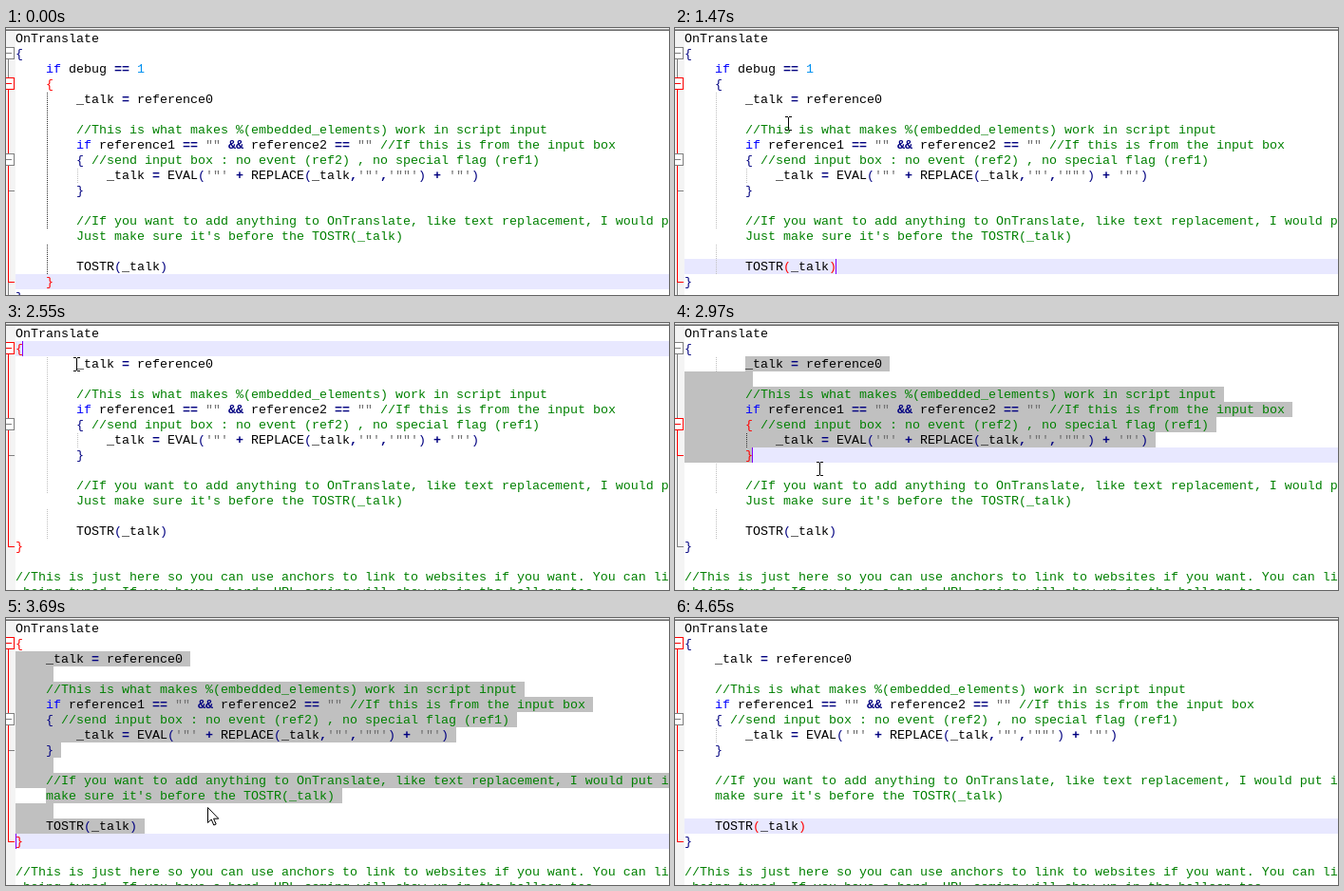
Write an HTML page that moves like this. It is 698x281 px and loops after 5130 ms.

```html
<!DOCTYPE html>
<html lang="en">
<head>
<meta charset="utf-8">
<title>Code editor</title>
<style>
  html, body { margin: 0; width: 100%; height: 100%; overflow: hidden; background: #fff; }
  #stage { position: relative; width: 698px; height: 281px; overflow: hidden; }
  #stage i, #stage p { position: absolute; margin: 0; }
  #view { font: 13.333px/16px "Liberation Mono", "Courier New", monospace; color: #000; }
  p { left: 10px; height: 16px; white-space: pre; }
  .gutter { left: 0; top: 0; width: 10px; height: 281px; background: #f4f4f4; }
  .edge { left: 0; top: 0; width: 698px; height: 1px; background: #f0f0f0;
          box-shadow: 0 1px #a0a0a0, 0 2px #696969; }
  .row { left: 10px; width: 688px; height: 16px; background: #e8e8ff; }
  .sel { height: 16px; background: #c0c0c0; }
  .guide { width: 1px; height: 16px;
           background: repeating-linear-gradient(transparent 0 1px, #c0c0c0 1px 2px); }
  .guide.on { background: repeating-linear-gradient(transparent 0 1px, #303030 1px 2px); }
  .caret { width: 1px; height: 16px; background: #8000ff; }
  .note { color: #008000; }
  .str { color: #707070; }
  .key { color: #0000ff; }
  .num { color: #0090f0; }
  .op { color: #000080; font-weight: bold; }
  .brace { color: #000080; }
  .hot { color: #f00; }
  svg { position: absolute; left: 0; top: 0; }
</style>
</head>
<body>
<div id="stage">
  <i class="gutter"></i>
  <div id="view"></div>
  <i class="edge"></i>
  <svg width="698" height="281">
    <g id="beam" shape-rendering="crispEdges">
      <path d="M-3 -6.5h3m1 0h3M-3 7.5h3m1 0h3M.5 -6v13" fill="none" stroke="#000"/>
    </g>
    <path id="arrow" d="M.5 .5v16l3.7-3.5 2.6 6 2.4-1-2.6-5.8h5.2z" fill="#fff" stroke="#000"/>
  </svg>
</div>
<script>
const LOOP = 5130, TICK = 30, LEFT = 10, TOP = 3, CELL = 8, ROW = 16;
const $ = id => document.getElementById(id);
const colX = c => LEFT + c * CELL;
const rowY = r => TOP + r * ROW;

const full = `OnTranslate
{
    if debug == 1
    {
        _talk = reference0
        
        //This is what makes %(embedded_elements) work in script input
        if reference1 == "" && reference2 == "" //If this is from the input box
        { //send input box : no event (ref2) , no special flag (ref1)
            _talk = EVAL('"' + REPLACE(_talk,'"','""') + '"')
        }
        
        //If you want to add anything to OnTranslate, like text replacement, I would put it here.
        Just make sure it's before the TOSTR(_talk)
        
        TOSTR(_talk)
    }
}

//This is just here so you can use anchors to link to websites if you want. You can link
 being typed. If you have a hard  URL coming will show up in the balloon too.`.split("\n");

const splice = (lines, at, count, ...added) => {
  const copy = lines.slice();
  copy.splice(at, count, ...added);
  return copy;
};
const unclosed = splice(full, 16, 1, "    ");
const bare = splice(full, 16, 1, "");
const joined = splice(full, 16, 1);
const gap = splice(joined, 2, 2, "");
const flat = splice(gap, 2, 1);
// removing the indent also lets one more word fit before the line wrap
const shifted = flat.map(s => s.replace(/^ {4}/, "")
  .replace(/here\.$/, "here. Just").replace("Just make", "make"));

const steps = [
  { at: 0, doc: full, caret: [16, 5], blink: 600 },
  { at: 690, doc: unclosed, caret: [16, 4] },
  { at: 990, doc: bare, caret: [16, 0] },
  { at: 1140, doc: joined, caret: [15, 20] },
  { at: 1590, doc: joined, caret: [3, 5] },
  { at: 1830, doc: joined, anchor: [3, 5], drag: true },
  { at: 2100, doc: gap, caret: [2, 0] },
  { at: 2220, doc: flat, caret: [1, 1] },
  { at: 2670, doc: flat, caret: [2, 8] },
  { at: 2730, doc: flat, anchor: [2, 8], drag: true },
  { at: 3510, doc: shifted, caret: [14, 0], anchor: [2, 0] },
  { at: 4110, doc: shifted, caret: [13, 16] }
];

// pointer strokes: time, x, y; the pointer is hidden between strokes
const strokes = [
  [[30, 688, 61], [240, 450, 190], [480, 333, 269], [600, 333, 269], [780, 344, 256], [990, 344, 256]],
  [[1170, 344, 256], [1380, 170, 130], [1590, 50, 60], [1830, 50, 60], [1920, 11, 45], [2100, 11, 45]],
  [[2250, 11, 45], [2430, 74, 43], [2730, 74, 43], [2970, 152, 153], [3330, 196, 225], [3510, 196, 225]],
  [[3570, 200, 221], [3690, 212, 199], [3840, 222, 196], [4020, 190, 216], [4110, 182, 219], [4350, 705, 190]]
];

function pointer(t) {
  const path = strokes.find(s => t >= s[0][0] && t < s[s.length - 1][0]);
  if (!path) return null;
  const n = path.findIndex(p => p[0] > t);
  const [t0, x0, y0] = path[n - 1], [t1, x1, y1] = path[n];
  const k = (t - t0) / (t1 - t0);
  return [Math.round(x0 + (x1 - x0) * k), Math.round(y0 + (y1 - y0) * k)];
}

function caretAt(doc, [x, y]) {
  const r = Math.floor((y - TOP) / ROW);
  const c = Math.round((x - LEFT) / CELL);
  return [r, Math.max(0, Math.min(c, doc[r].length))];
}

const indentOf = s => s.match(/^ */)[0].length;
const isWrapped = s => /^ *(Just make|make sure|being typed)/.test(s);

function matchBrace(doc, [r, c]) {
  const code = doc.map(s => isWrapped(s) ? "" : s.replace(/\/\/.*/, ""));
  const isBrace = i => i >= 0 && /[{}()]/.test(code[r][i] || " ");
  const start = [c - 1, c].find(isBrace);
  if (start === undefined) return [];
  const self = code[r][start], dir = "{(".includes(self) ? 1 : -1;
  const mate = { "{": "}", "}": "{", "(": ")", ")": "(" }[self];
  let depth = 0;
  for (let y = r, x = start; code[y] !== undefined; y += dir) {
    if (y !== r) x = dir > 0 ? 0 : code[y].length - 1;
    for (; x >= 0 && x < code[y].length; x += dir) {
      if (code[y][x] === self) depth++;
      if (code[y][x] === mate && --depth === 0) return [[r, start], [y, x]];
    }
  }
  return [];
}

const span = (cls, text) => `<span class="${cls}">${text.replace(/&/g, "&amp;")}</span>`;
const box = (cls, x, y, w) =>
  `<i class="${cls}" style="left:${x}px;top:${y}px${w ? `;width:${w}px` : ""}"></i>`;

function paint(text, r, hot) {
  if (isWrapped(text)) return span("note", text);
  const isHot = c => hot.some(h => h[0] === r && h[1] === c);
  return text.replace(/(\/\/.*)|('"+'|"")|(\bif\b)|(\b\d+\b)|([{}()])|[=&+,]/g,
    (m, note, str, key, num, brace, at) => span(
      note ? "note" : str ? "str" : key ? "key" : num ? "num" :
      isHot(at) ? "hot" : brace ? "brace" : "op", m));
}

function folds(doc, caretRow) {
  const open = [], blocks = [];
  doc.forEach((s, r) => {
    const ch = s.trim()[0];
    if (ch === "{") {
      const b = { from: r, to: 99 };
      open.push(b);
      blocks.push(b);
    }
    if (ch === "}" && open.length) open.pop().to = r;
  });
  const active = blocks.filter(b => b.from <= caretRow && caretRow <= b.to).pop();
  const mid = r => rowY(r) + 8;
  const ordered = blocks.filter(b => b !== active).concat(active || []);
  const tint = b => b === active ? "#f00" : "#808080";
  const rails = ordered.map(b =>
    `<path d="M2.5 ${mid(b.from)}V${Math.min(mid(b.to), 300) + .5}h6" stroke="${tint(b)}"/>`);
  const boxes = blocks.map(b =>
    `<rect x="-3.5" y="${mid(b.from) - 6.5}" width="12" height="12" fill="#fff" stroke="${tint(b)}"/>` +
    `<path d="M-1 ${mid(b.from) - .5}h7" stroke="${tint(b)}"/>`);
  return `<svg width="10" height="281" fill="none" shape-rendering="crispEdges">${rails.join("")}${boxes.join("")}</svg>`;
}

function selection(doc, a, b) {
  const [from, to] = a[0] < b[0] || (a[0] === b[0] && a[1] <= b[1]) ? [a, b] : [b, a];
  let out = "";
  for (let r = from[0]; r <= to[0]; r++) {
    const lead = isWrapped(doc[r]) ? indentOf(doc[r]) : 0;
    const c0 = r === from[0] ? from[1] : lead;
    const c1 = r === to[0] ? to[1] : doc[r].length + 1;
    if (c1 > c0) out += box("sel", colX(c0), rowY(r), (c1 - c0) * CELL);
  }
  return out;
}

function guides(doc, hot) {
  const rows = hot.map(h => h[0]);
  const lo = Math.min(...rows), hi = Math.max(...rows);
  return doc.map((s, r) => {
    let out = "";
    for (let c = 4; c < indentOf(s) && !isWrapped(s); c += 4) {
      const on = r > lo && r < hi && c === indentOf(doc[lo]);
      out += box(on ? "guide on" : "guide", colX(c) + 1, rowY(r));
    }
    return out;
  }).join("");
}

function editor(doc, caret, anchor, lit) {
  const hot = matchBrace(doc, caret);
  const text = doc.slice(0, 18).map((s, r) => `<p style="top:${rowY(r) + 1}px">${paint(s, r, hot)}</p>`);
  return box("row", LEFT, rowY(caret[0])) +
    (anchor ? selection(doc, anchor, caret) : "") +
    guides(doc, hot) + text.join("") + folds(doc, caret[0]) +
    (lit ? box("caret", Math.max(LEFT, colX(caret[1]) - 1), rowY(caret[0])) : "");
}

function place(el, pos) {
  el.style.display = pos ? "" : "none";
  if (pos) el.setAttribute("transform", `translate(${pos})`);
}

let shown = "";
function draw(t) {
  const i = steps.filter(s => s.at <= t).length - 1;
  const { at, doc, anchor, drag, blink = at } = steps[i];
  const pos = pointer(t);
  // while dragging, the caret trails the pointer by one tick
  const caret = drag ? caretAt(doc, pointer(t - TICK)) : steps[i].caret;
  const lit = drag || (t >= blink && (t - blink) % 1060 < 530);
  const key = [i, caret, lit].join();
  if (key !== shown) {
    $("view").innerHTML = editor(doc, caret, anchor, lit);
    shown = key;
  }
  const overSelection = anchor && !drag;
  place($("beam"), overSelection ? null : pos);
  place($("arrow"), overSelection ? pos : null);
}

const began = performance.now();
function frame() {
  const t = (performance.now() - began) % LOOP;
  draw(Math.floor(t / TICK) * TICK);
  requestAnimationFrame(frame);
}
frame();
</script>
</body>
</html>
```
